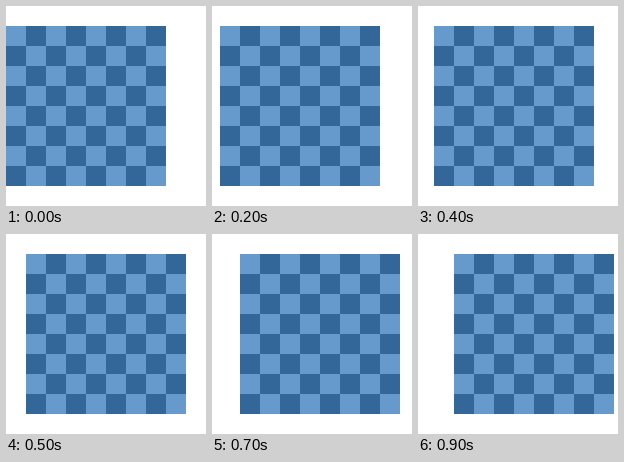
Write an HTML page that moves like this. It is 200 px wide and 200 px high and loops after 1000 ms.

```html
<!DOCTYPE html>
<html lang="en">
<head>
<meta charset="utf-8">
<title>Sliding checkerboard</title>
<style>
  html, body { margin: 0; width: 100%; height: 100%; overflow: hidden; background: #fff; }
  svg { display: block; width: 100%; height: 100%; }
</style>
</head>
<body>
<svg viewBox="0 0 200 200" shape-rendering="crispEdges">
  <g id="board">
    <rect y="20" width="160" height="160" fill="#6699cc"/>
    <path id="dark" fill="#336699"/>
  </g>
</svg>
<script>
  const CELL = 20, COUNT = 8, TOP = 20;
  const LOOP = 1000, STEP = 100, SHIFT = 4;
  const board = document.getElementById('board');

  let squares = '';
  for (let row = 0; row < COUNT; row++) {
    for (let col = (row + 1) % 2; col < COUNT; col += 2) {
      squares += `M${col * CELL} ${TOP + row * CELL}h${CELL}v${CELL}h-${CELL}z`;
    }
  }
  document.getElementById('dark').setAttribute('d', squares);

  // The board jumps right once per step, then snaps back.
  function draw(ms) {
    const step = Math.floor((ms % LOOP) / STEP);
    board.setAttribute('transform', `translate(${step * SHIFT} 0)`);
  }

  const start = performance.now();
  function tick() {
    draw(performance.now() - start);
    requestAnimationFrame(tick);
  }
  tick();
</script>
</body>
</html>
```
